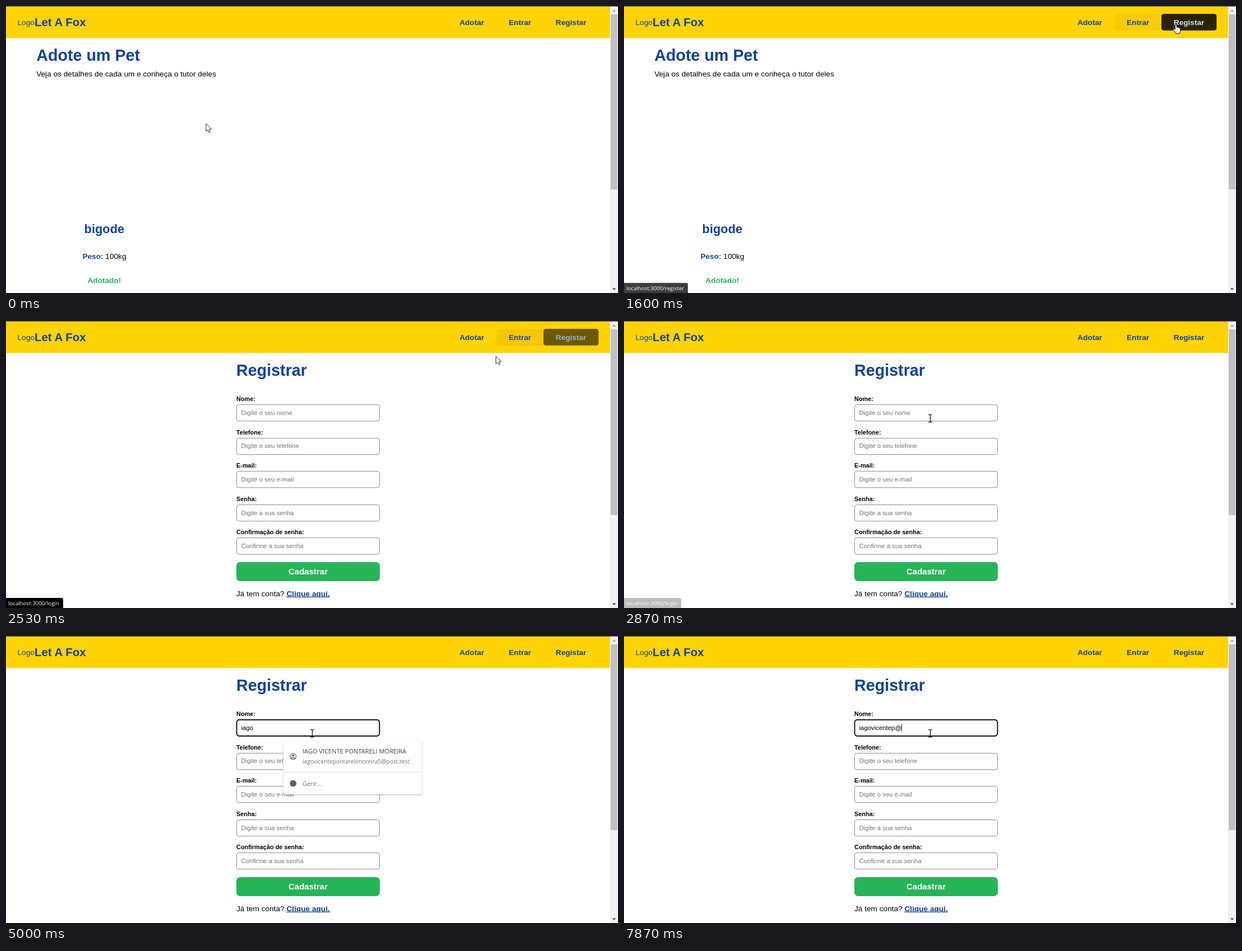
An HTML page for the animation above (8000 ms loop, 1092x513 px).

```html
<!DOCTYPE html>
<html lang="pt">
<head>
<meta charset="utf-8">
<title>Adote um Pet</title>
<style>
  html, body { margin: 0; width: 100%; height: 100%; overflow: hidden; background: #fff; }
  svg { display: block; width: 100vw; height: 100vh; }
  text { font: 13.653px "Liberation Sans", Arial, sans-serif; white-space: pre; }
  .b { font-weight: bold; }
  .blue { fill: #144298; }
  .mid { text-anchor: middle; }
  .title { font-size: 28.7px; }
  .label { font-size: 10.92px; }
  .field { font-size: 11.378px; }
  .hint { fill: #757575; }
  .ui { font-family: "Open Sans", "Noto Sans", sans-serif; }
</style>
</head>
<body>
<svg viewBox="0 0 1092 513" preserveAspectRatio="none">
  <defs>
    <filter id="shade" x="-10%" y="-10%" width="120%" height="125%">
      <feDropShadow dx="0" dy="1" stdDeviation="1.3" flood-color="#000" flood-opacity=".3"/>
    </filter>
  </defs>
  <rect width="1092" height="513" fill="#fff"/>
  <rect width="1078" height="57.3" fill="#ffd304"/>
  <text class="blue" x="20.5" y="34">Logo</text>
  <text class="blue b" x="50.9" y="36" style="font-size:20.48px">Let A Fox</text>
  <rect id="enterBox" x="875.1" y="14" width="83.9" height="29.8" rx="4.3"/>
  <rect id="joinBox" x="959" y="14" width="98.3" height="29.8" rx="4.3"/>
  <text class="blue b" x="809.2" y="34">Adotar</text>
  <text class="b" id="enter" x="897" y="34">Entrar</text>
  <text class="b" id="join" x="980.8" y="34">Registar</text>

  <g id="home">
    <text class="blue b title" x="54.2" y="98">Adote um Pet</text>
    <text x="54.2" y="126">Veja os detalhes de cada um e conheça o tutor deles</text>
    <text class="blue b mid" x="175.4" y="406.3" style="font-size:21.85px">bigode</text>
    <text x="136.4" y="452.3"><tspan class="blue b">Peso:</tspan> 100kg</text>
    <text class="b mid" x="175.4" y="495" fill="#27b457">Adotado!</text>
  </g>

  <g id="form">
    <text class="blue b title" x="411" y="98">Registrar</text>
    <g id="fields"></g>
    <rect id="ring" x="411.6" y="149.8" width="254.8" height="28.9" rx="4.6" fill="none" stroke="#101010" stroke-width="1.9"/>
    <text id="typed" class="field" x="419.6" y="167.8"></text>
    <rect id="caret" y="157.5" width="1" height="12.8"/>
    <rect x="411" y="431" width="256" height="34" rx="6.5" fill="#27b457"/>
    <text class="b mid" x="539" y="453.4" fill="#fff" style="font-size:15.02px">Cadastrar</text>
    <text x="411" y="491.6">Já tem conta? <tspan class="blue b" text-decoration="underline">Clique aqui.</tspan></text>
    <g id="popup">
      <g filter="url(#shade)">
        <path d="M499 187H507.5L514 181.5L520.5 187H738a4 4 0 0 1 4 4V279a4 4 0 0 1-4 4H499a4 4 0 0 1-4-4V191a4 4 0 0 1 4-4z" fill="#fff"/>
      </g>
      <path d="M495 243.5H742" stroke="#e2e3e5"/>
      <g fill="none" stroke="#5f6368" stroke-width="1.2">
        <circle cx="512.3" cy="215.2" r="5.4"/>
        <path d="M508.3 218.8q4-2.8 8 0" stroke-width="1.5"/>
      </g>
      <circle cx="512.3" cy="213.6" r="2" fill="#5f6368"/>
      <text class="ui" x="529" y="210.3" fill="#3c4043" style="font-size:11.09px">IAGO VICENTE PONTARELI MOREIRA</text>
      <text class="ui" x="529" y="228" fill="#70757a" style="font-size:10.24px">iagovicentepontarelimoreira5@post.test</text>
      <circle cx="512.3" cy="263.3" r="5.9" fill="#5f6368"/>
      <text class="ui" x="529" y="267.5" fill="#70757a" style="font-size:11.09px">Gerir...</text>
    </g>
  </g>

  <rect x="1077.8" width="14.2" height="513" fill="#f1f1f1"/>
  <rect id="thumb" x="1079" y="15" width="12" fill="#c1c1c1"/>
  <path d="M1081.5 10H1088.5L1085 6.5z" fill="#a3a3a3"/>
  <path d="M1081.5 504.5H1088.5L1085 508z" fill="#505050"/>
  <rect width="1092" height="1" fill="#4d4a38"/>

  <g id="status">
    <path id="statusBox"/>
    <text id="statusText" class="ui" x="4" y="508" fill="#fff" style="font-size:9.7px"></text>
  </g>

  <g id="cursor" stroke-linejoin="round">
    <path id="arrow" d="M.4.4V14.2L3.5 11.3L5.7 16L7.9 15L5.8 10.4H10z" fill="#fff" stroke="#000" stroke-width=".85"/>
    <path id="hand" d="M-1.5 9.5V1.2a1.3 1.3 0 0 1 2.6 0V6q2.2-.7 2.4.6 2-.6 2.3.6 1.9-.3 1.9 1.2V12q0 2.2-1.5 3.6V17.2H-.4V15.8Q-2.6 13.6-5 10.2q-.6-1.6 1-1.6z" fill="#fff" stroke="#000" stroke-width=".9"/>
    <path id="beam" d="M-3.5-6.5H-1L0-6L1-6.5H3.5M0-6V6.2M-3.5 6.7H-1L0 6.2L1 6.7H3.5" fill="none" stroke="#000" stroke-width="1.2"/>
  </g>
</svg>
<script>
const LOOP = 8000, STEP = 200 / 3, BLINK = 1600 / 3, FADE = 450;
const PAGE_AT = 2133, FOCUS_AT = 3067;
const NAME = 'iagovicentep@';
const KEYS = [4067, 4133, 4333, 4467, 5333, 5533, 5667, 5733, 5800, 6067, 6200, 7267, 7867];
// time, x, y of the pointer's hot spot
const PATH = [
  [0, 354, 211], [200, 870, 7], [333, 655, 171], [533, 655, 171],
  [1133, 930, 58], [1200, 950, 35], [1333, 975, 30], [1467, 985, 32],
  [2333, 985, 32], [2400, 950, 38], [2533, 875, 62], [2867, 546.5, 174], [LOOP, 546.5, 174]
];
const YELLOW = [255, 211, 4], BLACK = [0, 0, 0], BLUE = [20, 66, 152], WHITE = [255, 255, 255];

const $ = id => document.getElementById(id);
const clamp = v => Math.min(1, Math.max(0, v));
const lerp = (a, b, p) => a + (b - a) * p;
const smooth = v => { v = clamp(v); return v * v * (3 - 2 * v); };
const mix = (a, b, p) => `rgb(${a.map((v, i) => Math.round(lerp(v, b[i], p)))})`;
const show = (id, on) => { $(id).style.display = on ? '' : 'none'; };

$('fields').innerHTML = [
  ['Nome:', 'Digite o seu nome'],
  ['Telefone:', 'Digite o seu telefone'],
  ['E-mail:', 'Digite o seu e-mail'],
  ['Senha:', 'Digite a sua senha'],
  ['Confirmação de senha:', 'Confirme a sua senha']
].map(([label, hint], i) => {
  const dy = i * 59.6;
  return `<text class="b label" x="411" y="${143 + dy}">${label}</text>
    <rect x="411.5" y="${Math.round(149 + dy) + .5}" width="255" height="29.3" rx="4" fill="#fff" stroke="#858585" stroke-width=".95"/>
    <text class="field hint" x="419.6" y="${167.8 + dy}">${hint}</text>`;
}).join('');
const nameHint = document.querySelector('.hint');

function hover(t, on, off) {
  return smooth((Math.min(t, off) - on) / FADE) * (1 - smooth((t - off) / FADE));
}

function paintLink(id, p) {
  $(id + 'Box').setAttribute('fill', mix(YELLOW, BLACK, p));
  $(id).setAttribute('fill', mix(BLUE, WHITE, p));
}

function drawStatus(t) {
  const login = t > 2460, w = login ? 102 : 114;
  $('status').setAttribute('opacity', clamp((t - 1400) / 267) * clamp(1 - (t - 2633) / 317));
  $('statusBox').setAttribute('d', `M0 495H${w - 3}q3 0 3 3V513H0z`);
  $('statusText').textContent = 'localhost:3000/' + (login ? 'login' : 'register');
}

function drawCursor(t) {
  const i = PATH.findIndex(k => k[0] > t);
  const [t0, x0, y0] = PATH[i - 1], [t1, x1, y1] = PATH[i];
  const p = (t - t0) / (t1 - t0);
  const x = lerp(x0, x1, p), y = lerp(y0, y1, p);
  const hand = x > 875 && x < 1057 && y > 14 && y < 44;
  const beam = t > PAGE_AT && x > 411 && x < 667 && y > 149 && y < 179;
  show('hand', hand);
  show('beam', beam);
  show('arrow', !hand && !beam);
  $('cursor').setAttribute('transform', `translate(${x} ${y})`);
}

function drawName(t) {
  const count = KEYS.filter(k => k <= t).length;
  const focused = t >= FOCUS_AT;
  const last = count ? KEYS[count - 1] : FOCUS_AT;
  const typed = $('typed');
  typed.textContent = NAME.slice(0, count);
  nameHint.style.display = count ? 'none' : '';
  show('ring', focused);
  show('caret', focused && Math.floor((t - last) / BLINK) % 2 === 0);
  const width = count ? typed.getComputedTextLength() : 0;
  $('caret').setAttribute('x', Math.round(419.6 + width));
  $('popup').setAttribute('opacity', focused ? clamp(1 - (t - 5267) / 266) : 0);
}

function draw(now) {
  const t = Math.floor((now % LOOP + 4) / STEP) * STEP % LOOP + 1;
  const form = t >= PAGE_AT;
  show('home', !form);
  show('form', form);
  $('thumb').setAttribute('height', form ? 332 : 313);
  paintLink('enter', Math.max(hover(t, 1133, 1267), hover(t, 2400, 2467)));
  paintLink('join', hover(t, 1267, 2333));
  drawStatus(t);
  if (form) drawName(t);
  drawCursor(t);
}

const start = performance.now();
function tick() {
  draw(performance.now() - start);
  requestAnimationFrame(tick);
}
tick();
</script>
</body>
</html>
```
